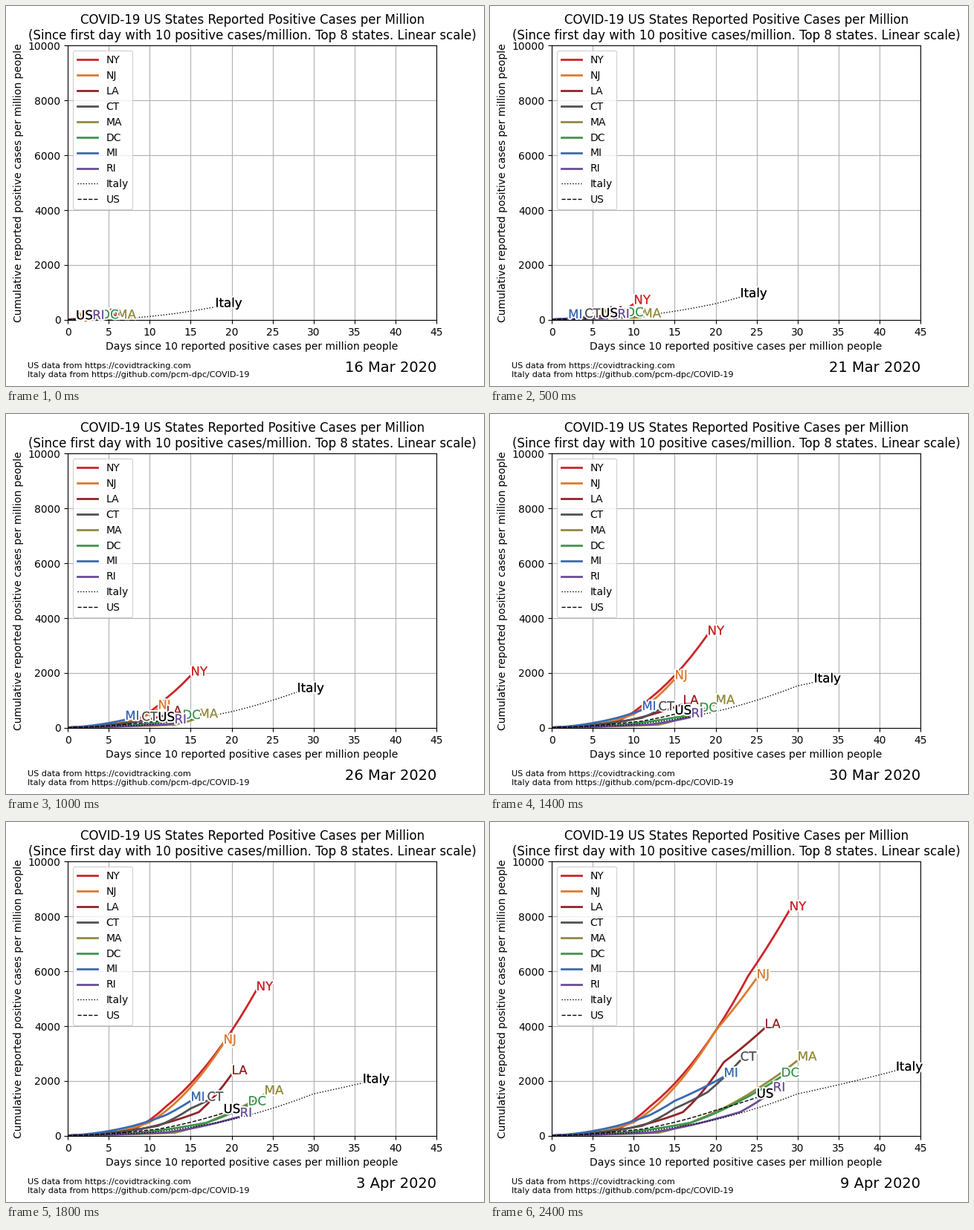
Recreate the animation shown at these times as a matplotlib script. Size 643 by 512 pixels, loop 4900 ms.

```python
import numpy as np
import matplotlib.pyplot as plt
from matplotlib.animation import FuncAnimation
from matplotlib.patheffects import Normal, withStroke

W, H, DPI = 643, 512, 100
STEPS, FRAMES, INTERVAL = 25, 49, 100   # 25 dates, the last one is held
FIRST = 12                              # cases per million on day 0

plt.rcParams["font.family"] = "DejaVu Sans"
fig = plt.figure(figsize=(W / DPI, H / DPI), dpi=DPI, facecolor="white")
ax = fig.add_axes([83.1 / W, 89.12 / H, 496 / W, 369.6 / H])
ax.set(xlim=(0, 45), ylim=(0, 10000),
       xlabel="Days since 10 reported positive cases per million people",
       ylabel="Cumulative reported positive cases per million people")
ax.set_title("COVID-19 US States Reported Positive Cases per Million\n"
             "(Since first day with 10 positive cases/million. "
             "Top 8 states. Linear scale)")
ax.grid(True)

halo = [withStroke(linewidth=3, foreground="white"), Normal()]
series = []


def add(name, color, *turns, style="-", width=2):
    """Grow quadratically between the (day, cases) turning points."""
    keys, totals = zip((0, FIRST), *turns)
    days = np.arange(keys[-1] + 1)
    cases = np.interp(days, keys, np.sqrt(totals)) ** 2
    line, = ax.plot([], [], style, color=color, lw=width, label=name)
    tag = ax.text(0, 0, name, color=color, fontsize=12, path_effects=halo)
    series.append((days, cases, line, tag))


add("NY", "#CC2529", (7, 122), (12, 1073), (24, 5845), (29, 8221))
add("NJ", "#DA7C30", (6, 149), (10, 496), (20, 3842), (25, 5745))
add("LA", "#922428", (9, 252), (16, 866), (21, 2688), (26, 3933))
add("CT", "#535154", (11, 362), (15, 998), (19, 1592), (23, 2744))
add("MA", "#948B3D", (13, 113), (18, 618), (25, 1703), (30, 2748))
add("DC", "#3E9651", (8, 101), (17, 485), (23, 1278), (28, 2158))
add("MI", "#396AB1", (8, 366), (12, 762), (15, 1276), (21, 2153))
add("RI", "#6B4C9A", (12, 125), (20, 620), (23, 870), (27, 1630))
add("Italy", "black", (9, 97), (20, 592), (30, 1532), (42, 2379),
    style=":", width=1)
add("US", "black", (11, 246), (20, 932), (25, 1396), style="--", width=1)

ax.legend(loc="upper left")


def note(x, y, text, size, **kw):
    return fig.text(x / W, 1 - y / H, text, fontsize=size, **kw)


note(28.7, 500, "US data from https://covidtracking.com\n"
     "Italy data from https://github.com/pcm-dpc/COVID-19", 8)
date = note(579.1, 493, "", 14, ha="right")


def update(frame):
    step = min(frame, STEPS - 1)
    for days, cases, line, tag in series:
        n = max(len(days) - (STEPS - 1 - step), 0)
        line.set_data(days[:n], cases[:n])
        tag.set_visible(n > 0)
        if n:
            tag.set_position((days[n - 1], cases[n - 1]))
    day = 16 + step
    date.set_text(f"{day} Mar 2020" if day <= 31 else f"{day - 31} Apr 2020")
    return []


anim = FuncAnimation(fig, update, frames=FRAMES, interval=INTERVAL,
                     init_func=lambda: update(0), repeat=True)
plt.show()
```
